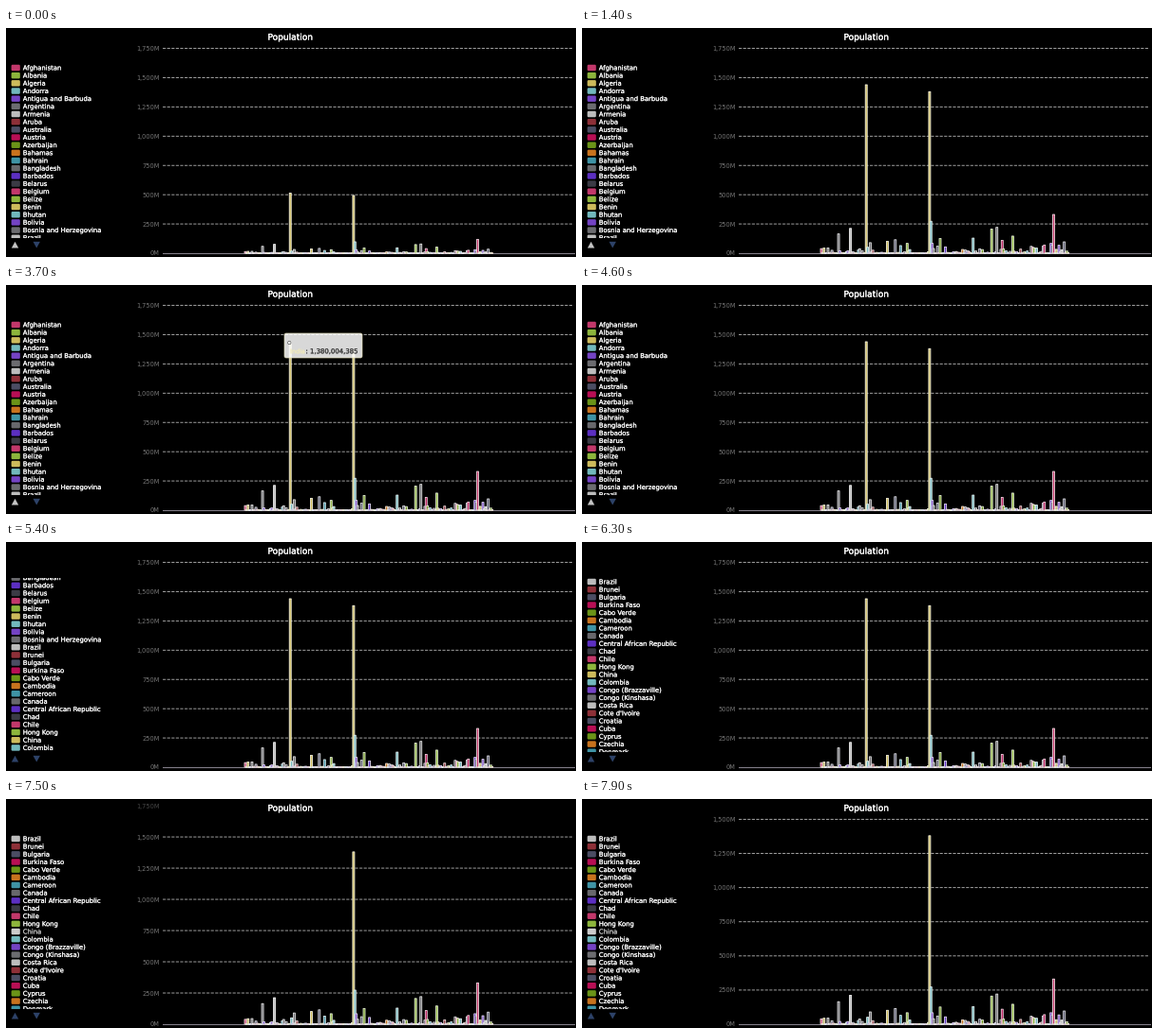
A matplotlib script for the animation above (8 s loop, 600 by 242 pixels).

```python
import numpy as np
import matplotlib.pyplot as plt
from matplotlib.animation import FuncAnimation
from matplotlib.collections import PolyCollection
from matplotlib.colors import to_rgb
from matplotlib.patches import Circle, FancyBboxPatch, Polygon
from matplotlib.patheffects import withStroke
from matplotlib.transforms import Bbox

W, H, DPI = 600, 242, 100
STEP, FRAMES = 100, 80
PX = 72 / DPI

PALETTE = ["#c2386b", "#8db53c", "#cdbb5c", "#72b8bd", "#7443c4", "#6c6c70",
           "#bdbdbd", "#8e3038", "#4b4d63", "#b80f55", "#6b9418", "#c8731e",
           "#3f93a5", "#68686c", "#5c2fc2", "#3b3b45"]

NAMES = """Afghanistan,Albania,Algeria,Andorra,Antigua and Barbuda,Argentina,
Armenia,Aruba,Australia,Austria,Azerbaijan,Bahamas,Bahrain,Bangladesh,Barbados,
Belarus,Belgium,Belize,Benin,Bhutan,Bolivia,Bosnia and Herzegovina,Brazil,Brunei,
Bulgaria,Burkina Faso,Cabo Verde,Cambodia,Cameroon,Canada,Central African Republic,
Chad,Chile,Hong Kong,China,Colombia,Congo (Brazzaville),Congo (Kinshasa),Costa Rica,
Cote d'Ivoire,Croatia,Cuba,Cyprus,Czechia,Denmark""".replace("\n", "").split(",")

# Populations in millions by series index; the rest are small.
LARGE = {0: 39, 2: 44, 5: 45, 8: 25, 13: 165, 22: 212, 28: 27, 29: 38, 34: 1439,
         35: 51, 37: 90, 39: 26, 50: 102, 56: 115, 60: 65, 65: 84, 67: 31,
         82: 1380, 83: 273, 84: 84, 85: 40, 88: 60, 90: 126, 94: 54, 107: 32,
         109: 28, 115: 129, 120: 37, 122: 31, 129: 206, 133: 221, 136: 33,
         137: 110, 138: 38, 145: 146, 151: 35, 159: 59, 160: 51, 161: 47,
         163: 44, 168: 60, 169: 70, 174: 84, 175: 68, 176: 331, 178: 33,
         180: 68, 182: 30, 184: 97, 186: 18}
CHINA = 34
N = 188
BASE, TOP = 238, 21.5
BAR_X, PITCH, BAR_W = 252, 1.389, 2.0
ROW0, ROW_H, PAGE = 42, 8.17, 22
ICON_W, ICON_H = 9.2, 6.5

rng = np.random.default_rng(4)
pop = np.minimum(rng.exponential(5, N), 20)
for i, value in LARGE.items():
    pop[i] = value


def cubic_out(t):
    return 1 - (1 - np.clip(t, 0, 1)) ** 3


def cubic_in_out(t):
    t = np.clip(t, 0, 1)
    return 4 * t ** 3 if t < 0.5 else 1 - 4 * (1 - t) ** 3


def lighten(color, amount):
    return tuple(c + (1 - c) * amount for c in to_rgb(color))


fig = plt.figure(figsize=(W / DPI, H / DPI), dpi=DPI, facecolor="black")
ax = fig.add_axes([0, 0, 1, 1])
ax.set_xlim(0, W)
ax.set_ylim(H, 0)
ax.axis("off")


def embolden(text, color, stroke):
    text.set_path_effects([withStroke(linewidth=stroke * PX, foreground=color)])


def label(x, y, text, size, color="white", stroke=0.0, **kw):
    t = ax.text(x, y, text, fontsize=size * PX, color=color,
                family="DejaVu Sans", **kw)
    if stroke:
        embolden(t, color, stroke)
    return t


label(299.3, 12.6, "Population", 9.05, stroke=0.25, ha="center")

# Value axis
ticks = np.arange(0, 1751, 250)
grid = [ax.plot([165, 597.5], [0, 0], color="#c4c4c4", lw=0.8 * PX,
                dashes=(4, 1.75), snap=False, zorder=1)[0] for _ in ticks[1:]]
tick_labels = [label(161.5, 0, f"{v:,}M", 6.6, "#757575", ha="right")
               for v in ticks]
ax.plot([165, 597.5], [BASE, BASE], color="#86818c", lw=PX, zorder=1)

# Bars
fills = [PALETTE[i % 16] for i in range(N)]
edges = [lighten(c, 0.82) for c in fills]
bars = PolyCollection([], facecolors=fills, edgecolors=edges,
                      linewidths=0.85 * PX, zorder=2)
bars.set_snap(False)
ax.add_collection(bars, autolim=False)

# Legend
window = Bbox([[0, H - 222], [140, H - 38]])
legend = []
for i, name in enumerate(NAMES):
    icon = FancyBboxPatch((5.6, 0), ICON_W, ICON_H, fc=PALETTE[i % 16], ec="none",
                          boxstyle="round,pad=0,rounding_size=1.3")
    ax.add_patch(icon)
    text = label(17.8, 0, name, 6.8, stroke=0.15, clip_on=True)
    for part in (icon, text):
        part.set_clip_box(window)
    legend.append((icon, text))

ARROW = "#2d4268"
up = ax.add_patch(Polygon([(5.8, 232.5), (13.2, 232.5), (9.5, 225.8)], ec="none"))
ax.add_patch(Polygon([(28.5, 225.8), (35.9, 225.8), (32.2, 232.5)],
                     fc=ARROW, ec="none"))

# Tooltip
tip_box = FancyBboxPatch((0, 0), 82, 26, fc="white", ec="#e4dfb4", lw=0.7 * PX,
                         boxstyle="round,pad=0,rounding_size=2", zorder=5)
tip_dot = Circle((0, 0), 1.7, fc="white", ec="#555555", lw=0.7 * PX, zorder=6)
ax.add_patch(tip_box)
ax.add_patch(tip_dot)
tip_name = label(0, 0, "", 6.4, "#efe9bb", 0.2, ha="right", zorder=6)
tip_value = label(0, 0, "", 6.9, "#444444", 0.3, ha="right", zorder=6)


def draw_bars(ms, scale):
    heights = pop * scale * cubic_out((ms + 137) / 1000)
    gone = np.clip((ms - 7250) / 200, 0, 1)
    quads = []
    for i, h in enumerate(heights):
        x0 = BAR_X + i * PITCH - BAR_W / 2
        x1 = x0 + BAR_W
        quads.append([(x0, BASE), (x0, BASE - h), (x1, BASE - h), (x1, BASE)])
    bars.set_verts(quads)
    alpha = np.ones(N)
    alpha[CHINA] = 1 - gone
    bars.set_alpha(alpha)


def draw_axis(scale, moved):
    for v, t in zip(ticks, tick_labels):
        t.set_y(BASE - v * scale + 2.5)
    for v, line in zip(ticks[1:], grid):
        y = BASE - v * scale
        line.set_ydata([y, y])
    grid[-1].set_visible(moved == 0)
    tick_labels[-1].set_alpha(float(1 - moved))


def draw_legend(ms):
    offset = PAGE * ROW_H * cubic_in_out((ms - 5075) / 600)
    for i, (icon, text) in enumerate(legend):
        y = ROW0 + i * ROW_H - offset
        shown = 32 < y < 228
        icon.set_visible(shown)
        text.set_visible(shown)
        icon.set_y(y - ICON_H / 2)
        text.set_y(y + 2.4)
    off = ms >= 7300
    icon, text = legend[CHINA]
    icon.set_facecolor("#cccccc" if off else PALETTE[CHINA % 16])
    shade = "#bbbbbb" if off else "white"
    text.set_color(shade)
    embolden(text, shade, 0.15)
    up.set_facecolor(ARROW if ms >= 5100 else "#c4c4c4")


def draw_tooltip(ms):
    alpha = float(np.clip((ms - 1400) / 250, 0, 1) * np.clip((4500 - ms) / 300, 0, 1))
    slide = cubic_out((ms - 3700) / 400)
    x, y = 293 + 67 * slide, 51 + 7 * slide
    india = ms >= 3700
    tip_box.set_x(x)
    tip_box.set_y(y)
    tip_dot.center = (x + 5.3, y + 10)
    tip_name.set_text("India" if india else "China")
    tip_value.set_text(": 1,380,004,385" if india else ": 1,439,323,776")
    tip_name.set_position((x + 22, y + 21.3))
    tip_value.set_position((x + 77.5, y + 21.3))
    tip_box.set_alpha(0.85 * alpha)
    for part in (tip_dot, tip_name, tip_value):
        part.set_alpha(alpha)
    for part in (tip_box, tip_dot, tip_name, tip_value):
        part.set_visible(alpha > 0)


def update(frame):
    ms = frame * STEP
    moved = cubic_in_out((ms - 7268) / 500)
    before, after = (BASE - TOP) / 1750, (BASE - TOP) / 1500
    scale = before + (after - before) * moved
    draw_bars(ms, scale)
    draw_axis(scale, moved)
    draw_legend(ms)
    draw_tooltip(ms)
    return []


anim = FuncAnimation(fig, update, frames=FRAMES, interval=STEP,
                     repeat=True, repeat_delay=0, blit=False)
plt.show()
```
